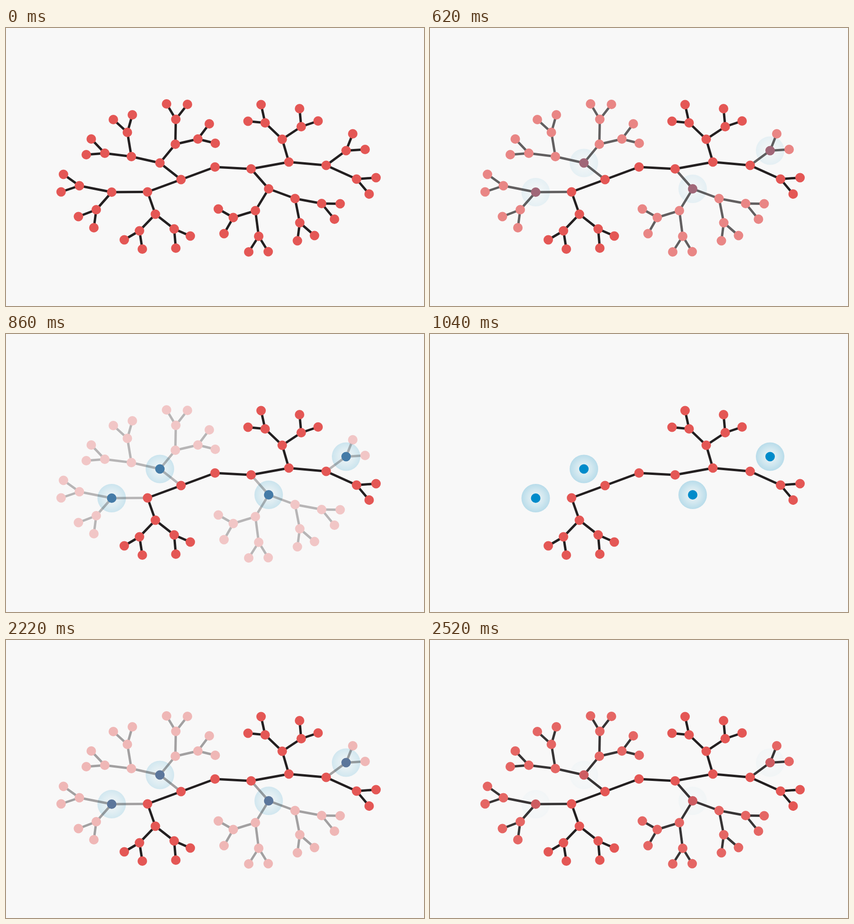
Animation of 880x586 px, one loop 2580 ms. Source, as an HTML page:

```html
<!DOCTYPE html>
<html lang="en">
<head>
<meta charset="utf-8">
<title>Tree removal</title>
<style>
  html, body { margin: 0; width: 100%; height: 100%; overflow: hidden; background: #f8f8f8; }
  svg { display: block; width: 100%; height: 100%; }
  line { stroke: #231f20; stroke-width: 5; }
  circle { fill: #e45755; }
</style>
</head>
<body>
<svg viewBox="0 0 880 586">
  <defs>
    <radialGradient id="glow">
      <stop offset="0" stop-color="#f4f7f7"/>
      <stop offset="1" stop-color="#b8dcea"/>
    </radialGradient>
  </defs>
  <g id="halos"></g>
  <g id="fading"></g>
  <g id="solid"></g>
  <g id="hubs"></g>
</svg>
<script>
// Binary tree in heap order: the parent of i is (i - 1) >> 1.
const nodes = [
  [440, 293],
  [368.5, 319.5], [516, 297],
  [324, 284.5], [298, 345.5], [595.5, 282.5], [553, 339],
  [264, 271], [356.5, 245], [222.5, 346], [314.5, 392.5],
  [581.5, 234.5], [674, 289.5], [525, 385], [608.5, 359.5],
  [208, 264], [255.5, 220], [357.5, 192.5], [404, 234],
  [154.5, 332.5], [190, 383], [281, 427.5], [354, 423.5],
  [545.5, 200], [621.5, 208], [716, 258.5], [738, 318.5],
  [478.5, 399.5], [532, 439], [664.5, 370], [618.5, 410.5],
  [179.5, 234], [169, 267], [226, 193], [266, 183],
  [338, 160], [382, 161], [428, 202], [440.5, 243],
  [121, 308.5], [116, 345.5], [152.5, 397.5], [185, 421],
  [249, 446.5], [287, 466], [388, 438.5], [357.5, 464],
  [537, 161.5], [509.5, 196.5], [618, 170], [657, 196],
  [730, 223], [756, 256], [779, 315.5], [764.5, 350],
  [447, 381.5], [459, 433.5], [511, 472], [552, 471.5],
  [703.5, 370.5], [691.5, 403], [613.5, 448.5], [649.5, 437.5]
];
const hubIds = [3, 6, 9, 25];
const RED = [228, 87, 85], BLUE = [0, 139, 202];
const LOOP = 2580, STEP = 60;

const [halos, fading, solid, hubs] =
  ["halos", "fading", "solid", "hubs"].map(id => document.getElementById(id));

function add(parent, tag, attrs) {
  const el = document.createElementNS("http://www.w3.org/2000/svg", tag);
  for (const k in attrs) el.setAttribute(k, attrs[k]);
  parent.appendChild(el);
  return el;
}

const parentOf = i => (i - 1) >> 1;
const isCut = i => i > 0 && (hubIds.includes(i) || isCut(parentOf(i)));
const layer = i => isCut(i) ? fading : solid;
const dot = (parent, [cx, cy], r) => add(parent, "circle", { cx, cy, r });

nodes.forEach(([x2, y2], i) => {
  if (!i) return;
  const [x1, y1] = nodes[parentOf(i)];
  add(layer(i), "line", { x1, y1, x2, y2 });
});
nodes.forEach((p, i) => {
  if (!hubIds.includes(i)) dot(layer(i), p, 10);
});
const hubDots = hubIds.map(i => {
  dot(halos, nodes[i], 30).style.fill = "url(#glow)";
  return dot(hubs, nodes[i], 10);
});

// Fade amount, moving in tenths.
function amount(t) {
  if (t < 500) return 0;
  if (t < 1040) return (Math.floor((t - 500) / STEP) + 1) / 10;
  if (t < 2040) return 1;
  return (9 - Math.floor((t - 2040) / STEP)) / 10;
}

function draw(t) {
  const p = amount(t);
  const mix = RED.map((c, k) => Math.round(c + (BLUE[k] - c) * p));
  halos.setAttribute("opacity", p);
  fading.setAttribute("opacity", 1 - p);
  hubDots.forEach(d => d.style.fill = `rgb(${mix})`);
}

function tick() {
  draw(performance.now() % LOOP);
  requestAnimationFrame(tick);
}
tick();
</script>
</body>
</html>
```
